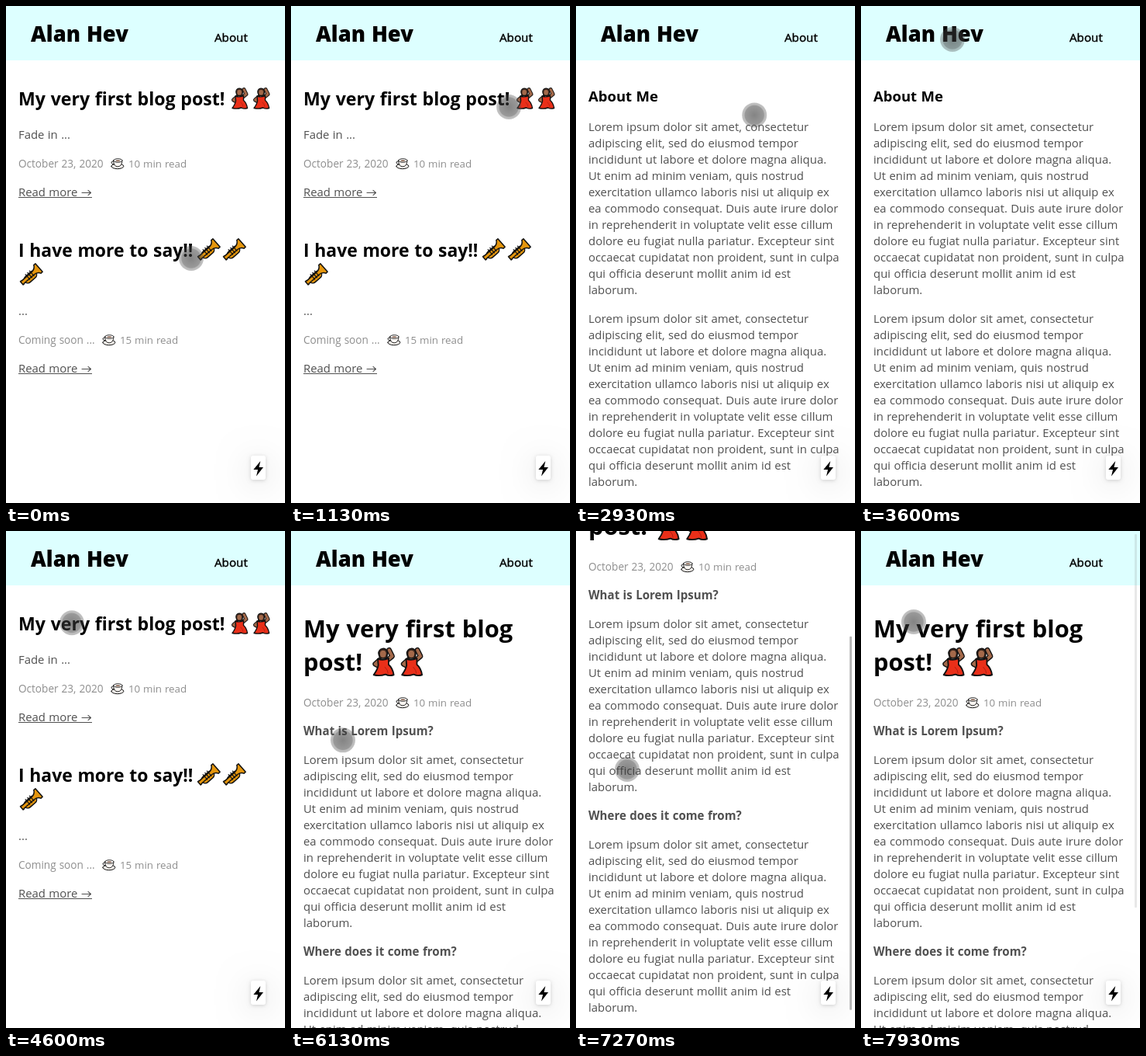
Recreate the animation shown at these times as an HTML page with a canvas. Size 360 by 640 pixels, loop 8 s.

```html
<!DOCTYPE html>
<html lang="en">
<head>
<meta charset="utf-8">
<title>Blog walkthrough</title>
<style>
html, body { margin: 0; width: 100%; height: 100%; overflow: hidden; background: #fff; }
canvas { display: block; width: 360px; height: 640px; }
</style>
</head>
<body>
<canvas id="stage"></canvas>
<script>
const W = 360, H = 640, LOOP = 8000, TICK = 200 / 3;
const canvas = document.getElementById('stage');
const g = canvas.getContext('2d');
const dpr = window.devicePixelRatio || 1;
canvas.width = W * dpr;
canvas.height = H * dpr;

const INK = '#505050', FAINT = '#8e8e8e';
const FAMILY = '"Open Sans", "Noto Sans", sans-serif';
const LOREM = [
  'Lorem ipsum dolor sit amet, consectetur',
  'adipiscing elit, sed do eiusmod tempor',
  'incididunt ut labore et dolore magna aliqua.',
  'Ut enim ad minim veniam, quis nostrud',
  'exercitation ullamco laboris nisi ut aliquip ex',
  'ea commodo consequat. Duis aute irure dolor',
  'in reprehenderit in voluptate velit esse cillum',
  'dolore eu fugiat nulla pariatur. Excepteur sint',
  'occaecat cupidatat non proident, sunt in culpa',
  'qui officia deserunt mollit anim id est',
  'laborum.'
];

// Pointer and scroll keys: [time, value, ...]
const POINTER = [
  [0, 239, 325], [400, 239, 325], [700, 250, 454], [1267, 287, 71], [1667, 293, 55],
  [2533, 293, 55], [2980, 222, 143], [3400, 148, 74], [3600, 118, 43],
  [4267, 118, 43], [4600, 85, 118], [4867, 66, 217], [5067, 65, 252],
  [6067, 65, 252], [6133, 67, 269], [6267, 66, 307],
  [7667, 66, 307], [7933, 68, 117], [8000, 68, 117]
];
const SCROLL = [
  [0, 0], [6133, 0], [6333, 90], [6600, 191], [7200, 191],
  [7267, 175], [7400, 32], [7467, 0], [8000, 0]
];

const clamp = v => Math.max(0, Math.min(1, v));

function slope(keys, i, c) {
  if (i < 1 || i > keys.length - 2) return 0;
  const rate = j => (keys[j + 1][c] - keys[j][c]) / (keys[j + 1][0] - keys[j][0]);
  const a = rate(i - 1), b = rate(i);
  return a * b <= 0 ? 0 : 2 * a * b / (a + b);
}

// Monotone cubic interpolation of one column
function sample(keys, t, c) {
  let i = 0;
  while (i < keys.length - 2 && t >= keys[i + 1][0]) i++;
  const a = keys[i], b = keys[i + 1], span = b[0] - a[0];
  const u = clamp((t - a[0]) / span), v = 1 - u;
  return a[c] * (1 + 2 * u) * v * v + b[c] * u * u * (3 - 2 * u)
    + span * u * v * (v * slope(keys, i, c) - u * slope(keys, i + 1, c));
}

function text(str, x, y, size, color = INK, weight = 400) {
  g.font = `${weight} ${size}px ${FAMILY}`;
  g.wordSpacing = size * 0.033 + 'px';
  g.fillStyle = color;
  g.fillText(str, x, y);
}

function box(x, y, w, h, r, color) {
  g.fillStyle = color;
  g.beginPath();
  g.roundRect(x, y, w, h, r);
  g.fill();
}

function shape(d, fill, line = 1.5, edge = '#111') {
  const p = new Path2D(d);
  if (fill) {
    g.fillStyle = fill;
    g.fill(p);
  }
  g.strokeStyle = edge;
  g.lineWidth = line;
  g.stroke(p);
}

function at(x, y, scale, angle, draw) {
  g.save();
  g.translate(x, y);
  g.scale(scale, scale);
  g.rotate(angle);
  g.lineJoin = g.lineCap = 'round';
  draw();
  g.restore();
}

function dancer(x, y, scale) {
  at(x, y, scale, 0, () => {
    const skin = '#a4694a';
    shape('M6.8 6 a4.4 4.4 0 0 1 8.8 -1 l-1 5.5 h-6.5 z', '#45291f', 1.2);
    for (const [w, c] of [[5, '#111'], [3, skin]]) {
      shape('M15 12.5 L20 8.5 L17 2.5', null, w, c);
      shape('M7.5 12.5 L3.5 16 L8 18.5', null, w, c);
    }
    shape('M7.8 5.8 a3.3 3.3 0 0 1 6.6 0 q0 4.2 -3.3 4.2 t-3.3 -4.2', skin, 0.5);
    shape('M6 11 Q11 13 16.5 10.5 L16.5 16.5 Q20.5 20 21.5 26.5 Q17 28 13.5 26 Q8 28 2 26.5 Q6 21 6.5 17 Z', '#e92f19', 1.4);
    shape('M13 19 Q16 22 16 25', null, 0.7, '#ae1d12');
  });
}

function trumpet(x, y) {
  at(x + 14.5, y + 13.5, 1, -0.72, () => {
    const gold = '#e5960d';
    shape('M-7 -3.5 h9 a4.5 4.5 0 0 1 0 9.5 h-9 a4.5 4.5 0 0 1 0 -9.5 z', gold);
    shape('M-16 -3 h2 v.5 H3 Q9 -3 11 -7.5 h2.8 v14 h-2.8 Q9 2 3 2 H-14 v.5 h-2 z', gold);
    shape('M-5 -5.5 V3 M-1.5 -5.5 V3 M2 -5.5 V3', null, 1.2);
  });
}

function coffee(x, y) {
  at(x, y, 1, 0, () => {
    shape('M.8 11.3 a8 3.4 0 0 0 16 0 a8 3.4 0 0 0 -16 0', '#f4f0ec', 1);
    shape('M4 5 q-3.6 -.3 -2.8 2.2 q1 2 4 2', null, 1);
    shape('M3.6 4 Q3.8 11.8 9.2 11.8 Q14.6 11.8 15 4 z', '#fbf7f3', 0.9);
    shape('M3.6 4 a5.7 2.3 0 0 1 11.4 0 a5.7 2.3 0 0 1 -11.4 0', '#fff', 0.9);
    shape('M6.3 4.3 a3 .8 0 0 1 6 0 a3 .8 0 0 1 -6 0', '#7c543e', 0.2, '#7c543e');
  });
}

function meta(when, minutes, x, y) {
  text(when, 16, y, 13.6, FAINT);
  coffee(x, y - 13);
  text(minutes + ' min read', x + 23, y, 13.3, FAINT);
}

function readMore(y) {
  text('Read more', 16, y, 14.92);
  at(97, y - 4.5, 1, 0, () => shape('M1 0 H12.5 M9 -3.2 L12.5 0 L9 3.2', null, 1.1, INK));
  g.fillStyle = INK;
  g.fillRect(16, y + 1, 95, 1);
}

function prose(y) {
  LOREM.forEach((line, i) => text(line, 16, y + i * 21, 14.92));
}

function home() {
  text('My very first blog post!', 16, 128, 23.1, '#000', 700);
  dancer(290, 105, 1);
  dancer(318, 105, 1);
  text('Fade in ...', 16, 171, 14.92);
  meta('October 23, 2020', 10, 135, 208);
  readMore(245);
  text('I have more to say!!', 16, 323, 22.9, '#000', 700);
  trumpet(247, 301);
  trumpet(280, 301);
  trumpet(18, 333);
  text('...', 16, 398, 14.92);
  meta('Coming soon ...', 15, 124, 435);
  readMore(472);
}

function about() {
  text('About Me', 16, 123, 18.5, '#000', 700);
  prose(161);
  prose(408);
}

function post() {
  text('My very first blog', 16, 137, 30.8, '#000', 700);
  text('post!', 16, 180, 30.8, '#000', 700);
  dancer(104, 150, 1.33);
  dancer(140.5, 150, 1.33);
  meta('October 23, 2020', 10, 135, 226);
  text('What is Lorem Ipsum?', 16, 263, 15.1, INK, 700);
  prose(300);
  text('Where does it come from?', 16, 547, 15.1, INK, 700);
  prose(584);
}

function tapGlow(t, start, x, y, w, h) {
  const a = t < start ? 0 : clamp(1 - (t - start) / 200);
  if (a > 0) box(x, y, w, h, 3, `rgba(51,181,229,${0.4 * a})`);
}

function header(t) {
  g.fillStyle = '#dff';
  g.fillRect(0, 0, W, 70);
  text('Alan Hev', 32, 46, 27.3, '#000', 800);
  text('About', 269, 46, 15.2, '#000');
  g.strokeStyle = '#000';
  g.lineWidth = 0.4;
  g.strokeText('About', 269, 46);
  tapGlow(t, 2133, 269, 29, 43, 21);
  tapGlow(t, 4067, 32, 16, 125, 38);
}

function boltButton() {
  g.save();
  for (const [alpha, blur, drop] of [[0.14, 40, 6], [0.16, 5, 1]]) {
    g.shadowColor = `rgba(0,0,0,${alpha})`;
    g.shadowBlur = blur * dpr;
    g.shadowOffsetY = drop * dpr;
    box(316, 579, 19, 31, 3, '#fff');
  }
  g.restore();
  g.fillStyle = '#000';
  g.fill(new Path2D('M328.3 586 L319.3 597 H325 L323 605.5 L332 594 H326.5 Z'));
}

function scrollbar(t, scroll) {
  let a = 0;
  if (t > 6150 && t < 7180) a = clamp(1 - (t - 6933) / 200);
  if (t > 7250) a = clamp(1 - (t - 7800) / 200);
  if (a > 0) box(353, 4 + scroll * 144 / 191, 3, 481, 1, `rgba(128,128,128,${0.55 * a})`);
}

function pointer(x, y) {
  const fill = g.createRadialGradient(x, y, 0, x, y, 16);
  fill.addColorStop(0, 'rgba(50,50,50,.6)');
  fill.addColorStop(0.76, 'rgba(60,60,60,.52)');
  fill.addColorStop(0.82, 'rgba(70,70,70,.38)');
  fill.addColorStop(1, 'rgba(80,80,80,.34)');
  g.fillStyle = fill;
  g.beginPath();
  g.arc(x, y, 16, 0, Math.PI * 2);
  g.fill();
}

function render(ms) {
  const t = Math.floor((ms % LOOP + 4) / TICK) * TICK + 1;
  const scroll = sample(SCROLL, t, 1);
  g.setTransform(dpr, 0, 0, dpr, 0, 0);
  g.fillStyle = '#fff';
  g.fillRect(0, 0, W, H);
  g.save();
  g.translate(0, -Math.round(scroll));
  header(t);
  if (t < 2130) home();
  else if (t < 4065) about();
  else if (t < 5598) home();
  else post();
  g.restore();
  boltButton();
  scrollbar(t, scroll);
  pointer(sample(POINTER, t, 1), sample(POINTER, t, 2));
}

const start = performance.now();
function loop() {
  render(performance.now() - start);
  requestAnimationFrame(loop);
}
loop();
</script>
</body>
</html>
```
